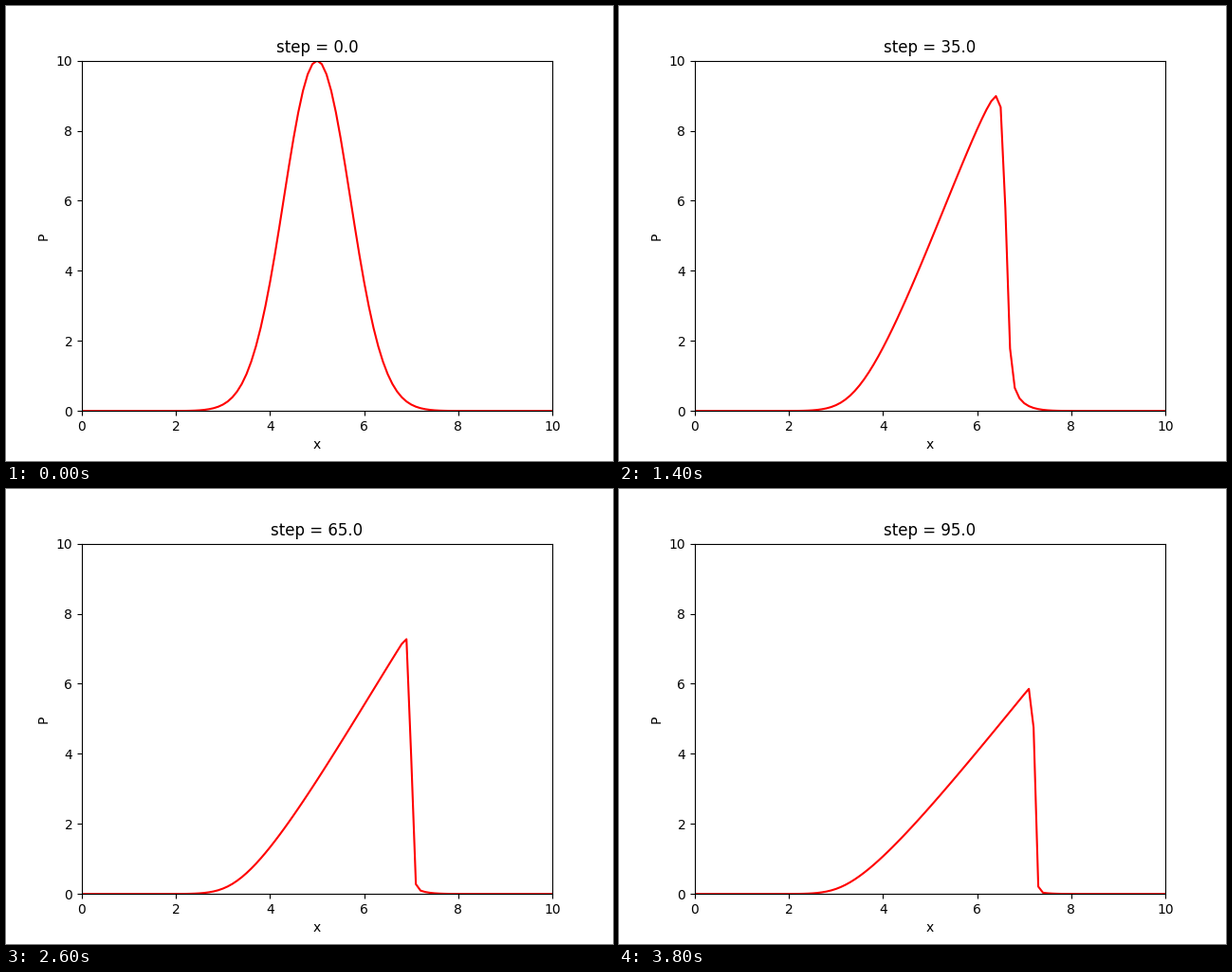
Write a matplotlib script that moves like this. It is 640 px wide and 480 px high and loops after 4000 ms.

```python
import numpy as np
import matplotlib.pyplot as plt
from matplotlib.animation import FuncAnimation

DX, DT = 0.1, 0.005
FRAMES, STRIDE, INTERVAL = 20, 5, 200

x = np.linspace(0, 10, 101)


def solve(steps):
    """Upwind solution of u_t + u u_x = 0, one row per step."""
    u = np.zeros((steps, x.size))
    u[0] = 10 * np.exp(-(x - 5) ** 2)
    for n in range(steps - 1):
        u[n + 1] = u[n]
        u[n + 1, 1:] -= DT / DX * u[n, 1:] * np.diff(u[n])
    return u


wave = solve(FRAMES * STRIDE)

fig, ax = plt.subplots(figsize=(6.4, 4.8), dpi=100)
line, = ax.plot(x, wave[0], color="red")
ax.set(xlim=(0, 10), ylim=(0, 10), xlabel="x", ylabel="P")
title = ax.set_title("step = 0.0")


def update(frame):
    step = frame * STRIDE
    line.set_ydata(wave[step])
    title.set_text(f"step = {step:.1f}")
    return line, title


anim = FuncAnimation(fig, update, frames=FRAMES, interval=INTERVAL,
                     repeat=True, repeat_delay=0, blit=False)
plt.show()
```
